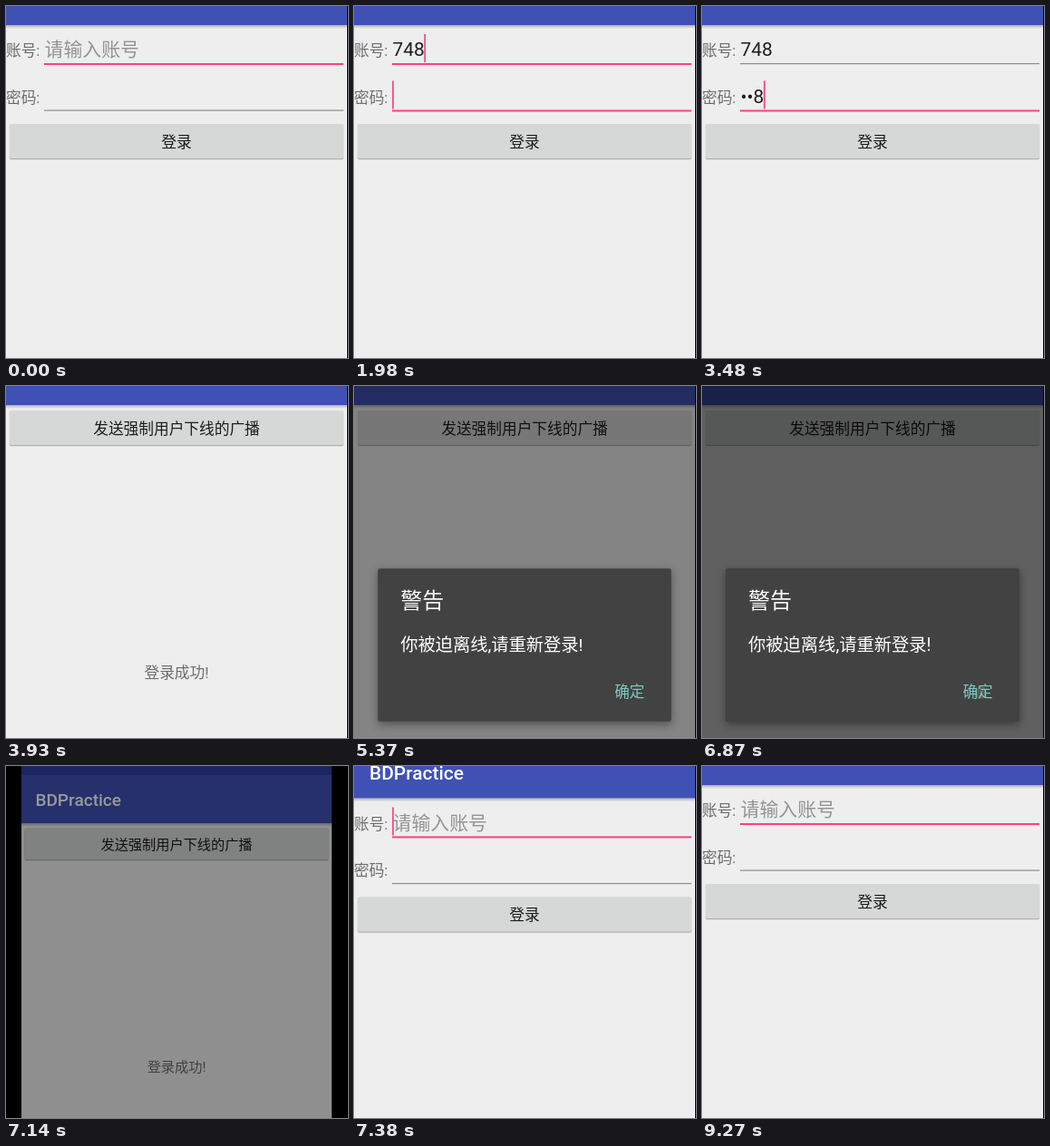
An HTML page for the animation above (9.63 s loop, 377 by 388 pixels).

```html
<!DOCTYPE html>
<html lang="zh-CN">
<head>
<meta charset="utf-8">
<title>Login demo</title>
<style>
  html, body { margin: 0; width: 100%; height: 100%; overflow: hidden; background: #000; }
  svg { display: block; width: 100%; height: 100%; }
  text { font-family: Roboto, "Noto Sans CJK SC", "Noto Sans CJK", sans-serif; white-space: pre; }
  .label { font-size: 16.7px; fill: #6d6d6d; }
  .button { font-size: 16.7px; fill: #1c1c1c; text-anchor: middle; }
  .field { font-size: 20.9px; fill: #1f1f1f; }
  .hint { font-size: 20.9px; fill: #949494; }
  .caret { fill: #ff4081; }
  #dialog { filter: drop-shadow(0 3px 5px rgba(0, 0, 0, .4)); }
</style>
</head>
<body>
<svg id="stage" viewBox="0 0 377 388" xmlns="http://www.w3.org/2000/svg"></svg>
<script>
const LOOP = 9630;
const PINK = '#ff4081', GREY = '#8c8c8c';
const TEXT_X = 42.5;

const rect = (x, y, w, h, attrs) => `<rect x="${x}" y="${y}" width="${w}" height="${h}" ${attrs}/>`;
const text = (x, y, cls, str, attrs = '') => `<text x="${x}" y="${y}" class="${cls}" ${attrs}>${str}</text>`;

// A raised button whose top edge is at y
const button = (y, str) =>
  rect(3.5, y, 369, 39.8, 'rx="2" fill="#000" fill-opacity=".08"') +
  rect(4, y + 1, 368, 38, 'rx="2" fill="#000" fill-opacity=".2"') +
  rect(4, y, 368, 38, 'rx="2" fill="#d6d7d7"') +
  text(188, y + 25.6, 'button', str);

// Status bar and most of the app bar lie above the visible area
const screen = (id, body) => `<g id="${id}">
  ${rect(0, -62.5, 376, 670, 'fill="#eee"')}
  ${rect(0, -62.5, 376, 25.5, 'fill="#303f9f"')}
  ${rect(0, -37.5, 376, 58.5, 'fill="#3f51b5"')}
  ${rect(0, 21, 376, 4, 'fill="url(#shade)"')}
  ${text(17, 0.3, 'title', 'BDPractice', 'font-size="20.9" font-weight="500" fill="#fff"')}
  ${body}</g>`;

const field = (id, y, label) =>
  text(0, y + 55.2, 'label', label) +
  text(TEXT_X, y + 55, 'field', '', `id="${id}Text"`) +
  rect(42, y + 63, 330, 2, `id="${id}Line"`) +
  rect(0, y + 31, 1.7, 31, `id="${id}Caret" class="caret"`);

const stage = document.getElementById('stage');
stage.innerHTML = `
  <defs><linearGradient id="shade" x1="0" y1="0" x2="0" y2="1">
    <stop offset="0" stop-color="#000" stop-opacity=".26"/>
    <stop offset="1" stop-color="#000" stop-opacity="0"/>
  </linearGradient></defs>
  ${rect(0, 0, 377, 388, 'fill="#000"')}
  <g id="loginLayer">${screen('login',
    field('user', 0, '账号:') + text(TEXT_X, 55.3, 'hint', '请输入账号', 'id="hint"') +
    field('pass', 51.5, '密码:') + button(130, '登录'))}</g>
  ${screen('home',
    button(27, '发送强制用户下线的广播') +
    text(188, 322, 'label', '登录成功!', 'text-anchor="middle"'))}
  ${rect(0, 0, 376, 388, 'id="dim" fill="#000"')}
  <g id="dialog">
    ${rect(26, 201, 324, 169, 'rx="2" fill="#424242"')}
    ${text(51, 244.5, 'heading', '警告', 'font-size="24" fill="#fff"')}
    ${text(51, 292.3, 'message', '你被迫离线,请重新登录!', 'font-size="19.3" fill="#fff"')}
    <circle id="ripple" cx="307" cy="338" fill="#fff" fill-opacity=".12"/>
    ${text(287.5, 342.8, 'action', '确定', 'font-size="16.6" fill="#80cbc4"')}
  </g>
  <g id="overLayer"></g>
  ${rect(376, 0, 1, 388, 'fill="#000"')}`;

const el = {};
stage.querySelectorAll('[id]').forEach(node => el[node.id] = node);

const clamp = v => Math.min(1, Math.max(0, v));
const span = (t, start, length) => clamp((t - start) / length);
const lerp = (a, b, p) => a + (b - a) * p;
const easeOut = (p, power) => 1 - (1 - p) ** power;
const smooth = p => p * p * (3 - 2 * p);
const within = (t, ...ranges) => ranges.some(([a, b]) => t >= a && t < b);
const set = (node, attrs) => { for (const key in attrs) node.setAttribute(key, attrs[key]); };
const show = (node, on) => { node.style.display = on ? '' : 'none'; };

function drawField(id, str, y, focused, caretOn) {
  const label = el[id + 'Text'], caret = el[id + 'Caret'];
  if (label.textContent !== str) label.textContent = str;
  set(el[id + 'Line'], { fill: focused ? PINK : GREY, height: focused ? 2 : 1.2 });
  caret.setAttribute('x', TEXT_X - 0.4 + (str ? label.getComputedTextLength() : 0));
  show(caret, caretOn);
}

function drawLogin(t) {
  const fresh = t >= 6870;
  const typed = fresh ? 0 : [1080, 1410, 1590].filter(at => t >= at).length;
  const secret = fresh ? 0 : [2340, 2430, 2520].filter(at => t >= at).length;
  // The newest password character stays readable for a moment
  const masked = secret ? '•'.repeat(secret - 1) + '748'[secret - 1] : '';
  show(el.hint, !typed);
  drawField('user', '748'.slice(0, typed), 0, fresh || t < 2040,
    within(t, [480, 960], [1080, 2040], [6870, 7620], [7830, 8310], [8790, 9270]));
  drawField('pass', masked, 51.5, !fresh && t >= 1980, within(t, [1980, 3000], [3480, 6870]));
}

function drawScreens(t) {
  const entering = t >= 7140;
  const parent = entering ? el.overLayer : el.loginLayer;
  if (el.login.parentNode !== parent) parent.appendChild(el.login);
  const rise = entering ? 736 * (1 - span(t, 7140, 330)) ** 3 : 0;
  set(el.login, { transform: `translate(0 ${rise})` });
  show(el.login, t < 3930 || entering);

  show(el.home, within(t, [3590, 7470]));
  if (t < 6870) {
    const shift = 53 * (1 - easeOut(span(t, 3580, 350), 5));
    set(el.home, {
      transform: `translate(0 ${shift})`,
      opacity: easeOut(span(t, 3580, 200), 4)
    });
  } else {
    const p = smooth(span(t, 6870, 270));
    set(el.home, {
      transform: `translate(${17 * p} ${43.9 * p}) scale(${lerp(1, 0.9096, p)})`,
      opacity: lerp(1, 0.6, p)
    });
  }
}

function drawDialog(t) {
  const leaving = t >= 6870;
  const dim = leaving ? 1 - span(t, 6870, 210) : span(t, 5200, 230);
  const alpha = leaving ? 1 - span(t, 6870, 150) : span(t, 5210, 150);
  const size = lerp(0.9, 1, easeOut(span(t, 5210, 220), 3));
  show(el.dim, dim > 0);
  show(el.dialog, alpha > 0);
  set(el.dim, { opacity: 0.6 * dim });
  set(el.dialog, {
    opacity: alpha,
    transform: `translate(188 285.5) scale(${size}) translate(-188 -285.5)`
  });
  show(el.ripple, t >= 6660);
  set(el.ripple, { r: lerp(4, 7, span(t, 6660, 60)) });
}

function draw(t) {
  drawScreens(t);
  drawLogin(t);
  drawDialog(t);
}

const start = performance.now();
function tick() {
  draw((performance.now() - start) % LOOP);
  requestAnimationFrame(tick);
}
tick();
</script>
</body>
</html>
```
